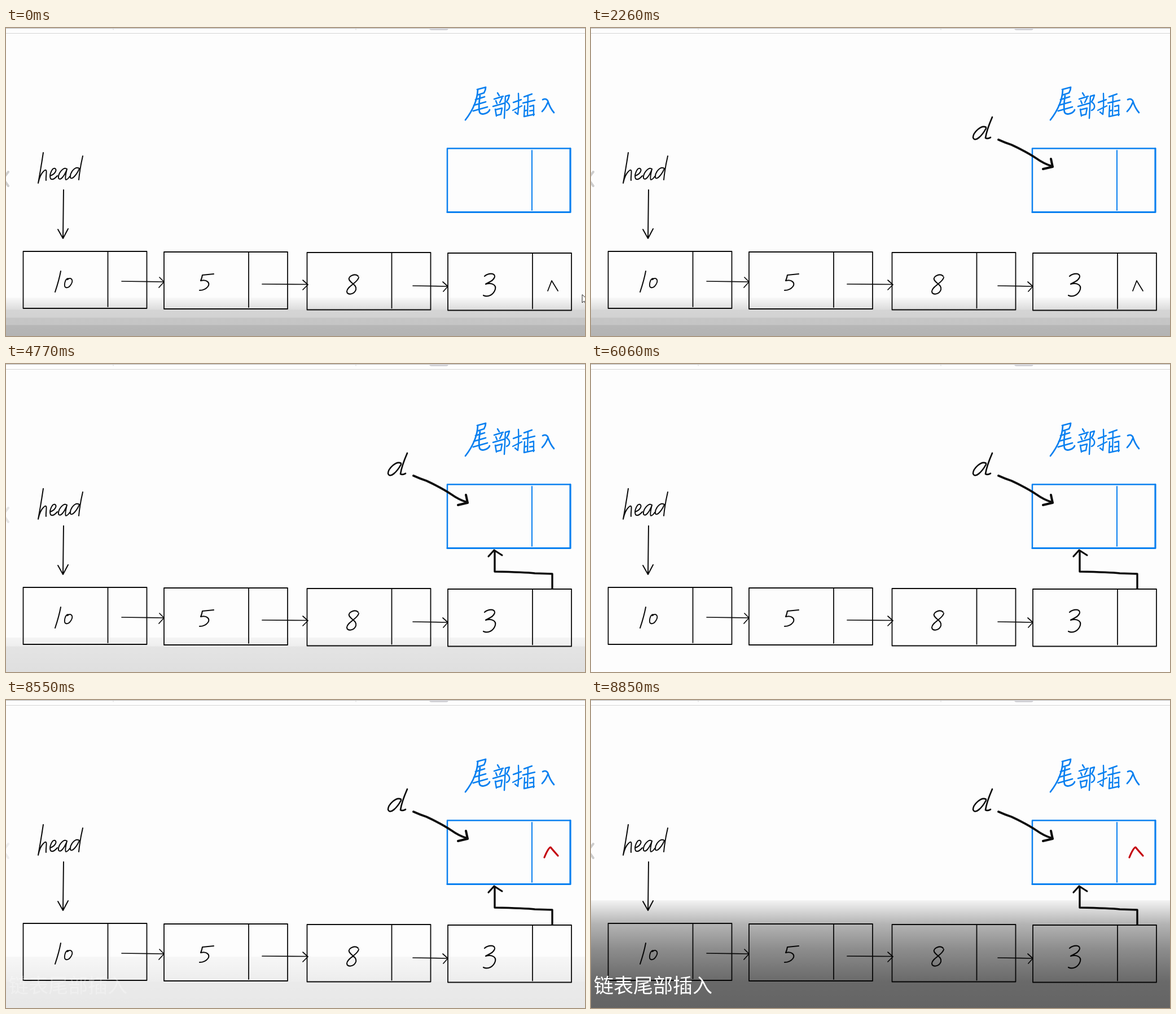
Write an HTML page that moves like this. It is 1026x546 px and loops after 9.57 s.

```html
<!DOCTYPE html>
<html lang="zh">
<head>
<meta charset="utf-8">
<style>
  html, body { margin: 0; width: 100%; height: 100%; overflow: hidden; background: #fdfdfd; }
  svg { display: block; width: 1026px; height: 546px; }
  path { fill: none; stroke-linecap: round; stroke-linejoin: round; }
  text { font: 35px "Noto Sans CJK SC", "Noto Sans CJK", sans-serif; fill: #fff; }
</style>
</head>
<body>
<svg id="stage" viewBox="0 0 1026 546"></svg>
<script>
const LOOP = 9570;
const BLACK = '#0c0c0c', BLUE = '#0a80f0', RED = '#c4000c';
const stage = document.getElementById('stage');

function add(name, attrs, parent = stage) {
  const node = document.createElementNS('http://www.w3.org/2000/svg', name);
  for (const key in attrs) node.setAttribute(key, attrs[key]);
  return parent.appendChild(node);
}
const ink = (d, width = 2, stroke = BLACK) => add('path', { d, stroke, 'stroke-width': width });

// Window edge at the top
add('rect', { width: 1026, height: 1, fill: '#b8b8b8' });
add('rect', { y: 9, width: 1026, height: 1, fill: '#d4d4d4' });
ink('M190 0V3M620 0V3', 1, '#cfcfcf');
add('rect', { x: 750, y: -4, width: 34, height: 8, rx: 4, fill: '#d2d2d6' });
const chevron = ink('M4 255L-5 267L4 280', 4, '#cdcdcd');

// Linked list nodes
const nodes = [[30.5, 396, 249.5, 497, 180.5], [280, 397, 499, 498, 430],
  [533.5, 398, 752.5, 499.5, 683.5], [783, 399, 1002, 500.5, 933]];
for (const [x1, y1, x2, y2, split] of nodes) {
  ink(`M${x1} ${y1}H${x2}V${y2}H${x1}Z`, 1.8);
  ink(`M${split} ${y1 + 1}V${y2 - 3}`, 1.8);
}
ink('M205 449L280 450M272 442L280 450L271 460', 1.7);
ink('M454 454L534 454.5M526 447L535 455L526 464', 1.7);
ink('M721 457L783 458M774 450L783 458L775 467', 1.7);

// Digits
ink('M97 431Q94 447 87 468');
ink('M110 444C104 445 102 458 106 460C113 462 120 449 116 445Q113 442 109 446', 1.9);
ink('M368 436L348 438Q347 444 345 448C356 445 362 452 358 458Q353 465 343 465', 2.1);
ink('M624 440C619 434 606 440 608 446C611 453 622 455 620 464C617 473 604 474 604 467C604 458 624 451 625 442', 2.1);
ink('M848 440C855 434 867 434 866 441C864 449 854 451 850 454C860 451 869 455 867 463C864 473 854 478 846 474', 2.2);

// "head" and its pointer
ink('M66 221Q62 248 57 275Q61 257 69 252C74 250 70 263 71 270');
ink('M78 262C86 260 91 252 87 249C82 247 76 260 79 267Q83 271 91 262');
ink('M108 250C102 245 92 258 93 266C96 272 104 262 108 250Q104 266 106 269Q109 269 113 263');
ink('M130 249C122 244 113 257 114 265C117 271 127 257 130 249M136 227Q131 248 129 269', 2);
ink('M102 287L101 372M92 357L101 373L110 356', 2);

// Heading, one path per character
ink('M835 109L850 105Q850 110 847 115L835 119M836 109Q835 136 814 163M848 122L832 127M850 131L829 137M853 140L828 147M840 120Q837 139 839 149C842 156 855 151 857 145', 2.8, BLUE);
ink('M871 115L874 120M865 126L881 121M868 129L870 134M879 124L875 132M863 139L884 133M867 144L869 156M867 145L879 142L877 153L869 155M885 121L892 119Q891 125 887 131C895 136 893 144 887 146M885 121L883 160', 2.5, BLUE);
ink('M899 132L913 127M908 116Q909 137 907 153L902 149M898 146L914 138M918 122L932 117M916 133L937 128M925 120L924 155M919 138L918 157M928 139L935 137L935 155M918 157L936 153M919 147L922 146M928 147L934 146', 2.4, BLUE);
ink('M951 127Q957 124 960 129Q964 142 971 150M960 132Q956 142 950 148', 2.7, BLUE);

// New node
ink('M1000 213.5H782V326.5', 2.5, BLUE);
ink('M782 326.5H1000V213.5', 3.2, BLUE);
ink('M932 217V323', 2, BLUE);

// Strokes that appear step by step at the listed times
const steps = (t, times) => times.filter(at => t >= at).length / times.length;
const pen = (times, d, width, color) => {
  const path = ink(d, width, color);
  path.setAttribute('pathLength', 1);
  return { path, times };
};
const drawn = [
  pen([430, 570, 720], 'M700 176C691 171 677 186 677 194C680 204 693 191 700 178', 2.6),
  pen([860, 1000, 1150], 'M711 158Q701 181 699 195Q703 197 708 194', 2.7),
  pen([1300, 1420, 1540, 1840], 'M722 198Q733 203 745 207Q773 220 789 231Q803 241 817 245', 3.8),
  pen([2140], 'M815 232L818 246', 4),
  pen([2260], 'M818 246L801 250', 4),
  pen([4190, 4330, 4480], 'M968 398V372L937 371Q920 369 866 368V332', 3.4),
  pen([4620], 'M855 341L865 330L879 339', 3.2),
  pen([6640, 6780, 6920, 7070], 'M954 279Q961 262 965 261Q969 266 978 276', 3.2, RED)
];
const nullMark = pen([2690, 2870, 3050, 3230], 'M960 466L967 448L978 466', 1.8);

function reveal(path, amount) {
  path.setAttribute('visibility', amount > 0 ? 'visible' : 'hidden');
  path.setAttribute('stroke-dasharray', amount < 1 ? `${amount} 2` : 'none');
}

// Player shade: [y, black opacity] stops
const defs = add('defs', {});
function shade(id, stops) {
  const top = stops[0][0], height = 546 - top;
  const gradient = add('linearGradient', { id, x2: 0, y2: 1 }, defs);
  for (const [y, alpha] of stops)
    add('stop', { offset: (y - top) / height, 'stop-opacity': alpha }, gradient);
  return add('rect', { y: top, width: 1026, height, fill: `url(#${id})` });
}
const shades = {
  fading: shade('fading', [[478, .02], [499, .13], [500, .16], [513, .17], [514, .22], [526, .22], [527, .28], [546, .29]]),
  faint: shade('faint', [[485, .035], [500, .06], [501, .1], [546, .12]]),
  rising: shade('rising', [[455, .025], [499, .065], [500, .075], [546, .085]]),
  full: shade('full', [[355, .04], [397, .29], [440, .44], [480, .54], [500, .585], [546, .605]])
};
const title = add('text', { x: 5, y: 519 });
title.textContent = '链表尾部插入';

// [start, shade, shade opacity, title opacity, chevron opacity]
const phases = [
  [0, 'fading', 1, 0, 1],
  [4620, 'fading', .7, 0, .8],
  [4770, 'faint', 1, 0, .5],
  [5040, 'faint', .4, 0, .2],
  [5190, 'faint', 0, 0, 0],
  [8400, 'rising', .3, 0, .1],
  [8550, 'rising', 1, .3, .3],
  [8700, 'full', .55, .7, .7],
  [8850, 'full', 1, 1, 1]
];

// Mouse pointer leaving the stage
const pointer = add('path', {
  d: 'M1021 473V487L1024.5 484L1027 489L1030 488L1028 483H1032Z',
  style: 'fill:#fff', stroke: '#222', 'stroke-width': 1
});

function render(t) {
  for (const { path, times } of drawn) reveal(path, steps(t, times));
  reveal(nullMark.path, 1 - steps(t, nullMark.times));
  const [, active, strength, titleAlpha, chevronAlpha] = phases.findLast(phase => t >= phase[0]);
  for (const name in shades) shades[name].setAttribute('opacity', name === active ? strength : 0);
  title.setAttribute('opacity', titleAlpha);
  chevron.setAttribute('opacity', chevronAlpha);
  pointer.setAttribute('visibility', t < 150 ? 'visible' : 'hidden');
}

const start = performance.now();
function tick() {
  render((performance.now() - start) % LOOP);
  requestAnimationFrame(tick);
}
tick();
</script>
</body>
</html>
```
